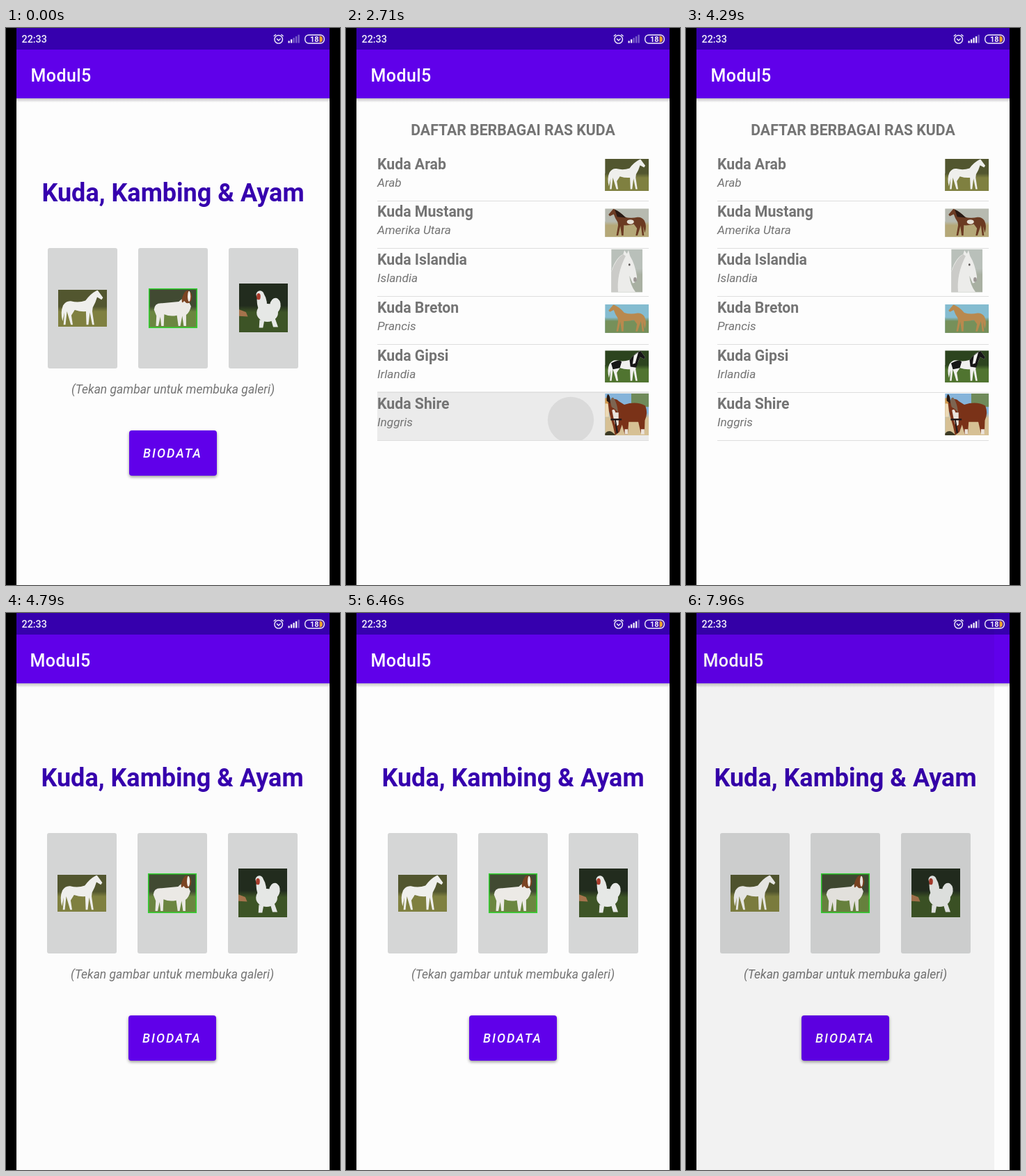
Animation of 480x800 px, one loop 8 s. Source, as an HTML page with a canvas:

```html
<!DOCTYPE html>
<html lang="id">
<head>
<meta charset="utf-8">
<title>Galeri ternak</title>
<style>
html, body { margin: 0; width: 100%; height: 100%; overflow: hidden; background: #000; }
canvas { display: block; width: 480px; height: 800px; }
</style>
</head>
<body>
<canvas id="stage" width="480" height="800"></canvas>
<script>
const ctx = document.getElementById('stage').getContext('2d');
const LOOP = 8000, LEFT = 15, WIDTH = 450, SLIDE = 450, PARALLAX = 112.5;
const APP = 'Modul5';
const PAPER = '#fdfdfd', GREY = '#747474', PURPLE = '#6000ea', DEEP = '#3600ae';

const clamp = v => Math.max(0, Math.min(1, v));

function rect(x, y, w, h, color) {
  ctx.fillStyle = color;
  ctx.fillRect(x, y, w, h);
}

function round(x, y, w, h, r, color) {
  ctx.fillStyle = color;
  ctx.beginPath();
  ctx.roundRect(x, y, w, h, r);
  ctx.fill();
}

function oval(x, y, rx, ry, color, turn = 0) {
  ctx.fillStyle = color;
  ctx.beginPath();
  ctx.ellipse(x, y, rx, ry, turn, 0, Math.PI * 2);
  ctx.fill();
}

function shape(d, color) {
  ctx.fillStyle = color;
  ctx.fill(new Path2D(d));
}

function text(str, x, y, font, color, align = 'left', gap = 0) {
  ctx.font = font + ' Roboto, sans-serif';
  ctx.letterSpacing = gap + 'px';
  ctx.textAlign = align;
  ctx.fillStyle = color;
  ctx.fillText(str, x, y);
}

// Animals are drawn in a 100 x 75 box.
const animals = {
  horse(fur) {
    shape('M9 64 Q4 46 10 32 Q16 22 26 23 Q42 27 56 22 Q66 8 78 2 L81 1 L84 5 L92 16 L89 20 L80 15 Q77 26 71 36 L70 44 L74 71 H70 L65 46 L62 71 H58 L57 44 Q46 45 34 41 L27 52 L30 71 H26 L21 54 L18 44 L15 71 H11 L13 46 Z', fur);
  },
  mustang(fur) {
    animals.horse(fur);
    oval(42, 35, 8, 6, '#e6e0d6');
    shape('M52 24 Q66 8 78 2 L72 22 Z', '#2a1a14');
  },
  pinto(fur) {
    animals.horse(fur);
    shape('M56 22 Q66 8 81 1 L92 16 L89 20 L80 15 L71 40 L58 38 Z M14 30 Q30 20 38 26 L34 41 L18 44 Z', '#161616');
    shape('M66 12 L76 4 L69 30 L63 32 Z', '#f2f2f0');
  },
  horseHead(fur) {
    shape('M0 75 V38 Q16 14 38 9 L42 2 L50 8 L55 2 L60 12 Q76 26 82 48 Q80 60 68 59 L58 46 Q60 62 78 75 Z', fur);
    shape('M38 9 Q16 16 0 40 V75 H22 Q16 44 46 12 Z', '#cbcbc8');
    oval(58, 27, 3, 2, '#55504f');
    oval(76, 53, 5, 4, '#9c9694');
  },
  shire() {
    rect(0, 8, 8, 32, '#d39a4c');
    rect(0, 18, 9, 24, '#ecd9b4');
    rect(60, 0, 40, 24, '#6f8a5a');
    shape('M0 72 Q10 62 24 75 H0 Z', '#3c3a24');
    shape('M7 17 Q22 5 32 14 L44 20 Q72 13 92 22 Q99 36 91 48 L90 72 H82 L76 51 L54 51 L52 73 H45 L39 56 L33 69 L23 75 Q19 58 13 44 Q8 32 7 17 Z', '#7a3218');
    shape('M4 13 Q3 4 7 1 Q13 5 12 18 Z', '#2a1810');
    shape('M12 14 Q15 5 20 8 Q28 18 30 34 L23 28 L15 24 Z', '#7d6551');
    shape('M16 30 Q22 26 24 34 L31 34 L31 56 Q24 62 21 50 Z', '#e9e3dc');
    shape('M13 45 L38 45 V48 L13 48 Z M25 48 L30 70 L26 72 L22 48 Z', '#241a1a');
    shape('M82 64 H90 V73 H82 Z M45 64 H52 V73 H45 Z', '#ece4da');
  },
  goat(fur, head = '#7b4423') {
    shape('M11 40 Q12 27 28 28 L62 25 Q70 17 80 20 L87 34 Q84 46 77 50 L77 71 H72 L69 52 L65 71 H61 L58 51 Q44 54 32 49 L31 71 H26 L24 54 L20 71 H15 L16 52 Z', fur);
    oval(80, 16, 9, 12, head);
    oval(72, 18, 3, 9, head, .3);
    oval(83, 15, 3, 10, '#f0eeea');
  },
  hen(fur) {
    oval(32, 36, 13, 10, fur, -.6);
    oval(50, 40, 25, 17, fur, -.2);
    oval(62, 26, 12, 18, fur);
    oval(65, 12, 10, 8, fur);
    oval(71, 14, 4, 4, '#5c5a5c');
    shape('M48 54 h4 v13 h-4 Z M58 54 h4 v12 h-4 Z', '#d2d0c4');
  },
  brahma(fur) {
    shape('M0 40 L14 44 L18 51 L0 50 Z', '#a5734c');
    oval(74, 34, 11, 12, fur, .5);
    oval(58, 45, 22, 14, fur);
    oval(47, 30, 10, 17, fur, -.2);
    oval(43, 17, 8, 6, fur);
    oval(40, 20, 4, 5, '#a93c2c');
    shape('M42 56 h10 l-3 12 h-8 Z M65 54 h9 l6 13 h-10 Z', fur);
  },
  rooster(fur) {
    oval(24, 36, 20, 27, fur);
    oval(25, 42, 10, 17, '#a8ac9a');
    oval(52, 48, 28, 17, fur);
    oval(72, 30, 10, 20, fur, .2);
    oval(75, 13, 7, 7, '#c03a2a');
    oval(79, 22, 4, 6, '#c03a2a');
    shape('M50 62 h4 v10 h-4 Z M60 62 h4 v10 h-4 Z', '#c9a840');
  },
  crested(fur) {
    rect(0, 0, 100, 16, '#c7c3ba');
    oval(38, 62, 34, 28, fur);
    oval(40, 29, 22, 16, '#d8b47c');
    oval(74, 22, 20, 13, '#a9713a');
    oval(78, 45, 15, 22, '#ba8448');
    oval(48, 38, 6, 5, '#94412a');
  }
};

function photo(cx, cy, w, h, [kind, fur, back, land, flip]) {
  ctx.save();
  ctx.translate(cx - w / 2, cy - h / 2);
  ctx.scale(w / 100, h / 75);
  ctx.beginPath();
  ctx.rect(0, 0, 100, 75);
  ctx.clip();
  rect(0, 0, 100, 75, back);
  const g = ctx.createLinearGradient(0, 34, 0, 75);
  g.addColorStop(0, back);
  g.addColorStop(.25, land);
  rect(0, 34, 100, 41, g);
  if (flip) { ctx.translate(100, 0); ctx.scale(-1, 1); }
  animals[kind](fur);
  ctx.restore();
}

const arab = ['horse', '#efefec', '#52562f', '#7f8040'];
const boer = ['goat', '#eceae6', '#414a32', '#6b8640'];
const brahma = ['brahma', '#e6e8e6', '#222c1e', '#3d5426'];
const shire = ['shire', '', '#86b4da', '#d6c094'];
const silkie = ['hen', '#ebebe6', '#304622', '#4b692e'];

const lists = {
  kuda: { title: 'KUDA', rows: [
    ['Kuda Arab', 'Arab', 63, 46, arab],
    ['Kuda Mustang', 'Amerika Utara', 63, 41, ['mustang', '#6b3a22', '#b7bab0', '#b5a878', true]],
    ['Kuda Islandia', 'Islandia', 45, 62, ['horseHead', '#ececea', '#b9c0ba', '#a9b0a2']],
    ['Kuda Breton', 'Prancis', 63, 41, ['horse', '#b9894e', '#84bcd0', '#76905a', true]],
    ['Kuda Gipsi', 'Irlandia', 63, 46, ['pinto', '#f0f0ee', '#2c441e', '#507430']],
    ['Kuda Shire', 'Inggris', 63, 60, shire]
  ] },
  ayam: { title: 'AYAM', rows: [
    ['Ayam Kapas', 'Tiongkok', 63, 62, silkie],
    ['Brahma', 'Amerika Serikat', 63, 62, brahma],
    ['Leghorn', 'Italia', 63, 42, ['rooster', '#f2f2ec', '#4d6a34', '#7c9a4c']],
    ['Polandia', 'Polandia', 47, 62, ['crested', '#c89a62', '#aaa79a', '#988768']],
    ['Kedu', 'Indonesia', 63, 62, silkie],
    ['Andalusia', 'Spanyol', 63, 42, ['hen', '#9da2a2', '#586944', '#a09474']]
  ] },
  kambing: { title: 'KAMBING', rows: [
    ['Kambing Boer', 'Afrika Selatan', 63, 51, boer],
    ['Kambing Spanyol', 'Spanyol', 63, 46, ['goat', '#8b6a48', '#647546', '#8f965a']],
    ['Kambing Alpen', 'Prancis', 63, 46, ['goat', '#5b4534', '#7d8f68', '#77904e']],
    ['Kambing kinder', 'USA', 63, 42, ['goat', '#b98b5c', '#536840', '#749052']],
    ['Kambing Kiko', 'Selandia Baru', 63, 46, ['goat', '#ece8e0', '#637a4c', '#839956']],
    ['Saanen', 'Swiss', 63, 46, ['goat', '#f1eee8', '#4c6a38', '#72944a']]
  ] }
};

function home() {
  text('Kuda, Kambing & Ayam', 240, 249, 'bold 36px', DEEP, 'center');
  for (const x of [60, 190, 320]) round(x, 316, 100, 173, 3, '#d5d6d6');
  photo(110, 402.5, 70, 53, arab);
  photo(240, 402.5, 70, 57, boer);
  ctx.strokeStyle = '#2fd42f';
  ctx.lineWidth = 1.5;
  ctx.strokeRect(205.7, 374.7, 68.6, 55.6);
  photo(370, 402, 70, 70, brahma);
  text('(Tekan gambar untuk membuka galeri)', 240, 525, 'italic 17.5px', GREY, 'center');
  ctx.save();
  ctx.shadowColor = 'rgba(0,0,0,.4)';
  ctx.shadowBlur = 4;
  ctx.shadowOffsetY = 2;
  round(177, 578, 126, 65, 4, PURPLE);
  ctx.restore();
  text('BIODATA', 197, 617, 'italic 500 18px', '#fff', 'left', 2);
}

function list(id, t) {
  const { title, rows } = lists[id];
  if (id === 'kuda') press(t);
  text('DAFTAR BERBAGAI RAS ' + title, 240, 154, 'bold 21.25px', GREY, 'center');
  rows.forEach(([name, place, w, h, pic], i) => {
    const y = 68.8 * i;
    text(name, 45, 202.5 + y, 'bold 21.25px', GREY);
    text(place, 45, 227.5 + y, 'italic 17.25px', GREY);
    photo(403.7, 211 + y, w, h, pic);
    rect(45, Math.round(247.5 + y), 390, 1, '#dedede');
  });
}

// Touch feedback on the last row.
function press(t) {
  const k = clamp((t - 2630) / 160);
  const fade = 1 - clamp((t - 2860) / 200);
  if (!k || !fade) return;
  ctx.save();
  ctx.globalAlpha = fade;
  ctx.beginPath();
  ctx.rect(45, 522, 390, 70);
  ctx.clip();
  rect(45, 522, 390, 70, '#ebebeb');
  oval(323, 563, 20 + 26 * k, 20 + 26 * k, '#dadada');
  ctx.restore();
}

function detail() {
  photo(240, 418, 262, 250, shire);
  text('Shire adalah jenis kuda penarik asal Inggris yang', 52, 644, '17.25px', GREY);
  text('berwarna hitam, cokelat, atau abu-abu.', 104, 665, '17.25px', GREY);
}

function page(id, dx, dim, t) {
  ctx.save();
  ctx.translate(Math.round(dx), 0);
  ctx.beginPath();
  ctx.rect(LEFT, 0, WIDTH, 800);
  ctx.clip();
  rect(LEFT, 0, WIDTH, 800, PAPER);

  if (id === 'home') home();
  else if (id === 'detail') detail();
  else list(id, t);

  const g = ctx.createLinearGradient(0, 101, 0, 107);
  g.addColorStop(0, '#c4c4c4');
  g.addColorStop(1, PAPER);
  rect(LEFT, 101, WIDTH, 6, g);
  rect(LEFT, 0, WIDTH, 31, DEEP);
  rect(LEFT, 31, WIDTH, 70, PURPLE);
  text(APP, 35.5, 76.5, '500 25px', '#fff', 'left', .4);
  if (dim > 0) rect(LEFT, 0, WIDTH, 800, `rgba(0,0,0,${.47 * dim})`);
  ctx.restore();
}

function statusBar(t) {
  const tone = '#f2f0fa';
  text('22:33', 22.5, 21, '500 14.3px', tone);
  ctx.strokeStyle = tone;
  ctx.lineWidth = 1.4;
  ctx.beginPath();
  ctx.arc(391.7, 16.3, 5.8, 0, Math.PI * 2);
  ctx.moveTo(389, 15.3);
  ctx.lineTo(391.7, 18);
  ctx.lineTo(394.6, 15.3);
  ctx.moveTo(384.8, 11.8);
  ctx.lineTo(388, 9.2);
  ctx.moveTo(395.4, 9.2);
  ctx.lineTo(398.6, 11.8);
  ctx.stroke();
  const lit = t < 3000 ? 2 : 4;
  for (let i = 0; i < 5; i++) {
    const h = 3 + i * 2.2;
    rect(405.5 + i * 3.5, 21.5 - h, 2.3, h, i < lit ? tone : '#7a60ca');
  }
  ctx.beginPath();
  ctx.roundRect(429.7, 10, 27.6, 12, 5.5);
  ctx.stroke();
  round(450.5, 11.5, 4.5, 9, [0, 4, 4, 0], '#e8a02c');
  text('18', 443.3, 20, 'bold 11px', tone, 'center');
}

// start, opening?, front page, page behind
const moves = [
  [640, true, 'kuda', 'home'],
  [2930, true, 'detail', 'kuda'],
  [3543, false, 'detail', 'kuda'],
  [4408, false, 'kuda', 'home'],
  [5430, true, 'ayam', 'home'],
  [6035, false, 'ayam', 'home'],
  [7073, true, 'kambing', 'home'],
  [7675, false, 'kambing', 'home']
];

// The page behind trails the front page a little.
const trail = r => r + .065 * (1 - (2 * r - 1) ** 12);

function draw(t) {
  rect(0, 0, 480, 800, '#000');
  ctx.save();
  ctx.beginPath();
  ctx.rect(LEFT, 0, WIDTH, 800);
  ctx.clip();
  const move = moves.filter(m => m[0] <= t).pop();
  if (!move) {
    page('home', 0, 0, t);
  } else {
    const [start, opening, front, behind] = move;
    const u = clamp((t - start) / SLIDE);
    const rest = (1 - u) ** 3;
    const away = opening ? rest : 1 - rest;
    const pushed = opening ? 1 - trail(rest) : trail(rest);
    if (away > 0) page(behind, -PARALLAX * pushed, pushed, t);
    if (away < 1) page(front, WIDTH * away, 0, t);
  }
  statusBar(t);
  ctx.restore();
}

const begin = performance.now();
function tick() {
  draw((performance.now() - begin) % LOOP);
  requestAnimationFrame(tick);
}
tick();
</script>
</body>
</html>
```
